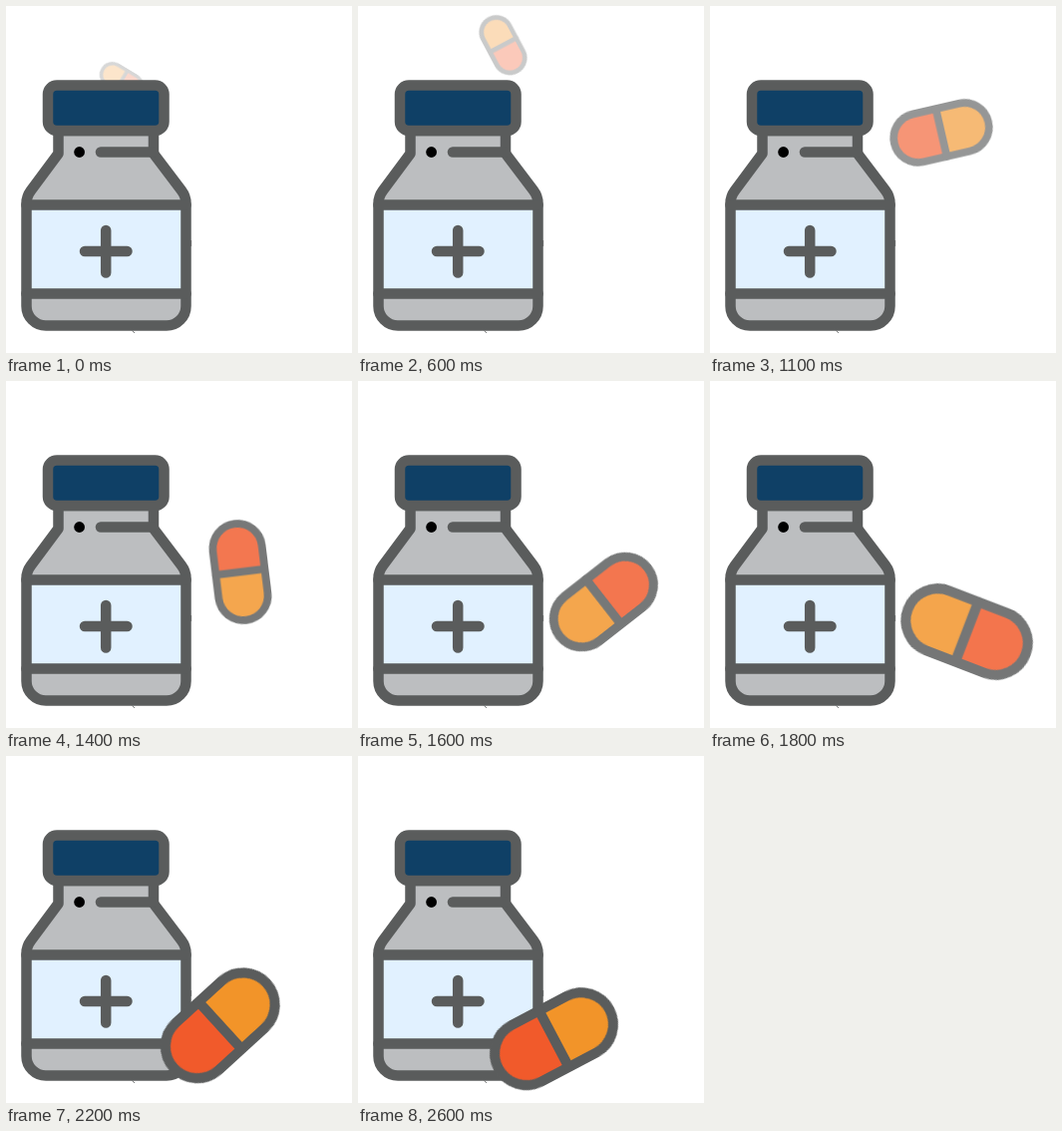
Animation of 347 by 348 pixels, one loop 3100 ms. Source, as an HTML page:

```html
<!DOCTYPE html>
<html lang="en">
<head>
<meta charset="utf-8">
<title>Pill and bottle</title>
<style>
  html, body {
    margin: 0;
    width: 100%;
    height: 100%;
    overflow: hidden;
    background: #fff;
  }
  svg {
    position: absolute;
    left: 0;
    top: 0;
    width: 347px;
    height: 348px;
  }
  .line {
    stroke: #5a5c5c;
    stroke-width: 10.5;
    stroke-linecap: round;
    stroke-linejoin: round;
  }
  #bottle { z-index: 1; }
  #layer { animation: depth 3100ms step-end infinite; }
  #pill { animation: tumble 3100ms infinite; }

  /* The pill leaves from behind the bottle and lands in front of it. */
  @keyframes depth {
    0% { z-index: 0; }
    29%, 100% { z-index: 2; }
  }

  /* Straight moves between poses, ticking every 100 ms. */
  @keyframes tumble {
    0% {
      transform: translate(116px, 74.5px) rotate(-149deg) scale(.35);
      opacity: .25;
      animation-timing-function: step-end;
    }
    6.4516% {
      transform: translate(121.5px, 67px) rotate(-144deg) scale(.375);
      opacity: .26;
      animation-timing-function: steps(4, end);
    }
    19.3548% {
      transform: translate(145.5px, 39.2px) rotate(-118deg) scale(.467);
      opacity: .33;
      animation-timing-function: step-end;
    }
    22.5806% {
      transform: translate(173.5px, 43px) rotate(-88deg) scale(.47);
      opacity: .36;
      animation-timing-function: steps(4, end);
    }
    35.4838% {
      transform: translate(232px, 127px) rotate(-13deg) scale(.768);
      opacity: .65;
      animation-timing-function: steps(2, end);
    }
    41.9354% {
      transform: translate(238px, 179px) rotate(49deg) scale(.77);
      opacity: .78;
      animation-timing-function: step-end;
    }
    45.1612% {
      transform: translate(235px, 191.5px) rotate(83deg) scale(.772);
      opacity: .83;
      animation-timing-function: steps(4, end);
    }
    58.0645% {
      transform: translate(257.5px, 251.5px) rotate(201deg) scale(1.004);
      opacity: .84;
      animation-timing-function: step-end;
    }
    61.2903% {
      transform: translate(247.5px, 252.5px) rotate(258deg) scale(1);
      opacity: .88;
      animation-timing-function: steps(3, end);
    }
    70.9677% {
      transform: translate(214.8px, 270.3px) rotate(317.6deg) scale(1);
      opacity: 1;
      animation-timing-function: steps(2, end);
    }
    77.4193% {
      transform: translate(197.3px, 283px) rotate(331.3deg) scale(1);
      opacity: 1;
      animation-timing-function: step-end;
    }
    83.8709%, 100% {
      transform: translate(196.5px, 283.7px) rotate(332.2deg) scale(1);
      opacity: 1;
    }
  }
</style>
</head>
<body>
<svg id="bottle" viewBox="0 0 347 348">
  <defs>
    <path id="body" d="M52.5 125V148L25 185Q20.5 191 20.5 198V301A19.5 19.5 0 0 0 40 320.5H161A19.5 19.5 0 0 0 180.5 301V198Q180.5 191 176 185L148 148V125Z"/>
  </defs>
  <use href="#body" fill="#bcbec0"/>
  <path d="M20.5 199.5H180.5V288.5H20.5Z" fill="#e1f1ff"/>
  <g class="line" fill="none">
    <use href="#body"/>
    <path d="M20.5 199.5H180.5M20.5 288.5H180.5"/>
    <path d="M95 146.5H148"/>
    <path d="M100.2 225V267.5M79 246H121.5"/>
    <rect x="42" y="79.5" width="116.5" height="45.5" rx="9" fill="#0f4066"/>
  </g>
  <circle cx="73.6" cy="146.5" r="5.4"/>
  <path d="M185.7 235V241M126.5 325.5L129 328" fill="none" stroke="#5a5c5c" stroke-width=".8"/>
</svg>
<svg id="layer" viewBox="0 0 347 348">
  <g id="pill">
    <path d="M0 -32H-31A32 32 0 0 0 -31 32H0Z" fill="#f15a2b"/>
    <path d="M0 -32H31A32 32 0 0 1 31 32H0Z" fill="#f29429"/>
    <g class="line" fill="none" style="stroke-width: 10">
      <rect x="-63" y="-32" width="126" height="64" rx="32"/>
      <path d="M0 -32V32"/>
    </g>
  </g>
</svg>
</body>
</html>
```
